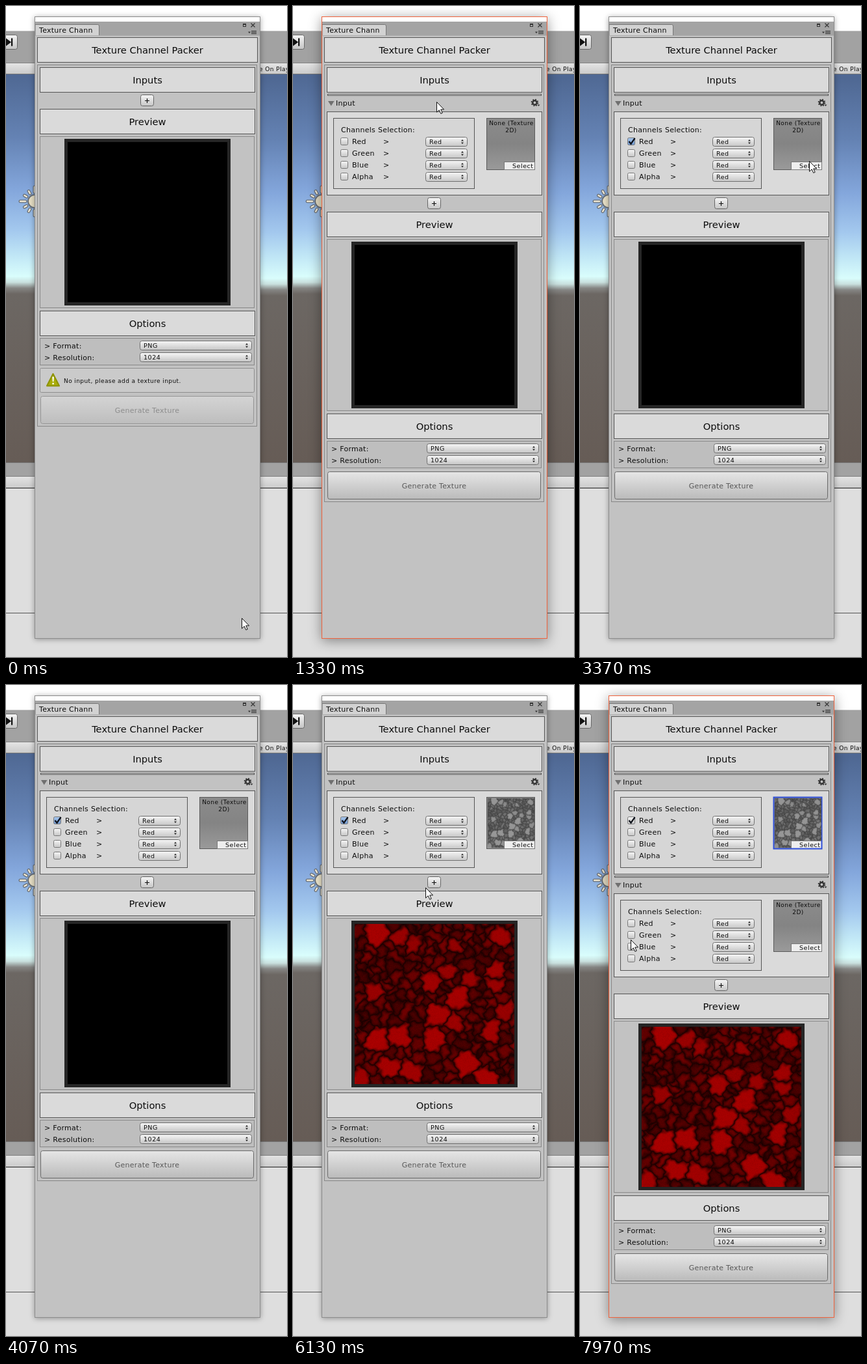
These frames come from a looping animation (433x1000 px, 8 s). An HTML page with a canvas:

```html
<!DOCTYPE html>
<html lang="en">
<head>
<meta charset="utf-8">
<title>Texture Channel Packer</title>
<style>
  html, body { margin: 0; width: 100%; height: 100%; overflow: hidden; background: #dedede; }
  #stage { position: relative; width: 433px; height: 1000px; overflow: hidden; }
  svg, canvas, #shadow { position: absolute; left: 0; top: 0; }
  #shadow { left: 44px; top: 16px; width: 348px; height: 956px; }
  text { font-family: "DejaVu Sans", Verdana, sans-serif; fill: #0c0c0c; white-space: pre; }
  .head { font-size: 14.7px; text-anchor: middle; }
  .body { font-size: 11px; letter-spacing: .28px; }
  .pop { font-size: 9.5px; letter-spacing: .55px; }
  .mini { font-size: 9px; letter-spacing: .45px; }
  .mid { text-anchor: middle; }
</style>
</head>
<body>
<div id="stage">
  <svg id="back" width="433" height="1000"></svg>
  <div id="shadow"></div>
  <svg id="ui" width="433" height="1000"></svg>
  <canvas id="preview" width="246" height="246"></canvas>
  <canvas id="thumb" width="72" height="76"></canvas>
  <svg id="top" width="433" height="1000">
    <path id="cursor" d="M.5 .5V16.2L4.2 12.8L6.8 18.4L9.2 17.3L6.7 11.9H11.6Z" fill="#fff" stroke="#111" stroke-width="1"/>
  </svg>
</div>
<script>
const $ = id => document.getElementById(id);
const LOOP = 8000, ROW = 158;

// ---------- markup helpers ----------
const rect = (x, y, w, h, fill, stroke, more = '') =>
  `<rect x="${x}" y="${y}" width="${w}" height="${h}" fill="${fill}" ${stroke ? `stroke="${stroke}"` : ''} ${more}/>`;
const box = (x1, y1, x2, y2, fill, stroke, more) =>
  rect(x1 + .5, y1 + .5, x2 - x1 - 1, y2 - y1 - 1, fill, stroke, more);
const text = (x, y, cls, s, more = '') => `<text x="${x}" y="${y}" class="${cls}" ${more}>${s}</text>`;
const path = (d, fill, more = '') => `<path d="${d}" fill="${fill}" ${more}/>`;
const gradient = (id, stops) => `<linearGradient id="${id}" x2="0" y2="1">` +
  stops.map(([at, c]) => `<stop offset="${at}" stop-color="${c}"/>`).join('') + '</linearGradient>';
const header = (y, s) => box(52, y, 384, y + 39, '#dadada', '#555') + text(218, y + 25, 'head', s);
const popup = (x1, y, x2, s) => {
  const a = x2 - 8, m = y + 7.5;
  return box(x1, y, x2, y + 15, 'url(#btn)', '#707070', 'rx="3"') +
    text(x1 + 6, y + 11, 'pop', s) +
    path(`M${a - 2} ${m - 1}h4l-2 -2.6zM${a - 2} ${m + 1}h4l-2 2.6z`, '#222');
};

// ---------- editor behind the window ----------
function sun() {
  let rays = '';
  for (let i = 0; i < 12; i++) {
    const a = i * Math.PI / 6, r = i % 3 ? 18 : 22, c = Math.cos(a), s = Math.sin(a);
    rays += `M${44 + 14 * c} ${300 + 14 * s}L${44 + r * c} ${300 + r * s}`;
  }
  const ray = (color, w) => path(rays, 'none', `stroke="${color}" stroke-width="${w}" stroke-linecap="round"`);
  return ray('#697079', 5) + ray('#eee7d2', 2.4) +
    '<circle cx="44" cy="300" r="10" fill="#e6dec4" stroke="#697079" stroke-width="2"/>';
}
const sky = [[0, '#4f6893'], [.16, '#6482b3'], [.3, '#84a7dc'], [.4, '#a3c8ee'], [.47, '#c2e8f6'],
  [.52, '#d9fdfc'], [.535, '#c9e0de'], [.55, '#858583'], [.565, '#6c6763'], [1, '#665c56']];
$('back').innerHTML = `<defs>${gradient('sky', sky)}${gradient('bar', [[0, '#e4e4e4'], [1, '#cbcbcb']])}
  ${gradient('step', [[0, '#f5f5f5'], [1, '#c4c4c4']])}</defs>` +
  rect(0, 0, 433, 38, '#fff') + rect(0, 38, 433, 50, '#a2a2a2') + rect(0, 38, 433, 1, '#c2c2c2') +
  box(-10, 44, 18, 67, 'url(#step)', '#666', 'rx="3"') +
  path('M0 49.5V61.5L8 55.5ZM8 49.5h2.2v12H8Z', '#111') +
  rect(0, 88, 433, 16, 'url(#bar)') + rect(0, 87, 433, 1, '#808080') + rect(0, 104, 433, 1, '#777') +
  text(390, 100, 'mini', 'e On Play') +
  rect(0, 105, 44, 597, 'url(#sky)') + rect(391, 111, 42, 591, 'url(#sky)') + rect(391, 105, 42, 7, '#4f6893') +
  sun() +
  rect(0, 701, 433, 21, '#a2a2a2') + rect(0, 701, 433, 1, '#777') +
  rect(0, 722, 433, 18, 'url(#bar)') + rect(0, 722, 433, 1, '#808080') +
  rect(0, 740, 433, 1, '#222') + rect(0, 741, 433, 259, '#dedede') + rect(0, 932, 433, 1, '#555');

// ---------- packer window ----------
function inputBlock(id) {
  let s = box(53, 135, 383, 138, '#dadada', '#555') +
    path('M54 146h9.5l-4.75 7.5z', '#707070') + text(66, 153, 'body', 'Input') +
    '<circle cx="372.5" cy="148.5" r="3.2" fill="none" stroke="#333" stroke-width="2.4"/>' +
    '<circle cx="372.5" cy="148.5" r="4.9" fill="none" stroke="#333" stroke-width="1.8" stroke-dasharray="1.92 1.93"/>' +
    path('M376.5 151.5h4l-2 2.5z', '#333') +
    box(52, 162, 384, 291, '#dadada', '#555') + box(62, 172, 280, 281, '#d6d6d6', '#555') +
    text(74, 194, 'body', 'Channels Selection:');
  ['Red', 'Green', 'Blue', 'Alpha'].forEach((name, i) => {
    const y = 202 + 18 * i;
    s += box(73, y, 85, y + 12, 'url(#btn)', '#777', `rx="2" id="${id}box${i}"`) +
      text(91, y + 10, 'body', name) + text(139, y + 10, 'body', '&gt;') + popup(204, y - 1, 269, 'Red');
  });
  s += path('M75.5 208l3 3.6L84.6 203', 'none', `id="${id}tick" stroke="#0b0f18" stroke-width="2.2"`) +
    box(298, 172, 373, 252, 'url(#slot)', '#5a5a5a') +
    text(336.5, 183, 'mini mid', 'None (Texture') + text(336, 194, 'mini mid', '2D)') +
    box(325, 239, 373, 252, '#eee', '#777') + text(338, 249, 'pop', 'Select') +
    rect(298.5, 172.5, 74, 79, 'none', '#2f4fd8', `stroke-width="2" id="${id}ring"`);
  return `<g id="${id}">${s}</g>`;
}

$('ui').innerHTML = `<defs>
  ${gradient('btn', [[0, '#f6f6f6'], [1, '#c6c6c6']])}
  ${gradient('down', [[0, '#a4a4a4'], [1, '#b8b8b8']])}
  ${gradient('on', [[0, '#a9c8ee'], [1, '#6f97cf']])}
  ${gradient('big', [[0, '#e6e6e6'], [1, '#bababa']])}
  ${gradient('slot', [[0, '#8b8b8b'], [.5, '#848484'], [1, '#9a9a9a']])}</defs>` +
  rect(44, 16, 348, 956, '#c2c2c2') + rect(45, 17, 346, 7, '#fff') + rect(45, 24, 346, 22, '#a4a4a4') +
  path('M45 46V28.5H141.5Q143.5 28.5 143.5 31V46', '#d2d2d2', 'stroke="#777"') +
  rect(45, 45, 346, 1, '#b0b0b0') + rect(45, 46, 346, 2, '#c2c2c2') +
  text(51, 41, 'body', 'Texture Chann') +
  rect(365.5, 27.5, 4, 4, 'none', '#333') + rect(365, 27, 5, 2, '#333') +
  path('M377.5 26.5l6 6m0 -6l-6 6', 'none', 'stroke="#333" stroke-width="1.1"') +
  path('M373 39.5h4l-2 2.5z', '#333') + path('M378 38.5h8m-8 2h8m-8 2h8', 'none', 'stroke="#333"') +
  rect(44.5, 16.5, 347, 955, 'none', '#8c8c8c', 'id="edge"') +
  box(48, 48, 388, 87, '#dadada', '#555') + text(218, 73, 'head', 'Texture Channel Packer') +
  box(48, 90, 387, 646, 'none', '#888', 'id="frame"') +
  header(94, 'Inputs') + inputBlock('a') + inputBlock('b') +
  '<g id="rest">' +
  box(207, 136, 228, 154, 'url(#btn)', '#666', 'rx="3" id="plus"') +
  path('M214 145.5h7m-3.5 -3.5v7', 'none', 'stroke="#111" stroke-width="1.2"') +
  header(158, 'Preview') + box(52, 200, 383, 464, 'none', '#8a8a8a') +
  rect(90, 204, 256, 256, '#252525') + rect(95, 209, 246, 246, '#000') +
  header(468, 'Options') + box(52, 510, 383, 552, '#bebebe', '#888') +
  text(59, 526, 'body', '&gt; Format:') + popup(206, 514, 379, 'PNG') +
  text(59, 544, 'body', '&gt; Resolution:') + popup(206, 532, 379, '1024') +
  '<g id="help">' + box(52, 556, 383, 594, '#cacaca', '#8f8f8f', 'rx="2"') +
  path('M72.5 565L82 583.5H63Z', '#a9ad0a', 'stroke="#8c9100" stroke-width="2" stroke-linejoin="round"') +
  path('M71.3 569.5h2.6l-.5 7.5h-1.6zM71.4 578.8h2.4v2.4h-2.4z', '#fff') +
  text(89, 579, 'mini', 'No input, please add a texture input.', 'style="letter-spacing:.4px"') + '</g>' +
  '<g id="make">' + box(53, 599, 382, 642, 'url(#big)', '#6a6a6a', 'rx="3"') +
  text(217.5, 625, 'body mid', 'Generate Texture', 'style="fill:#585858"') + '</g></g>';

// ---------- stone texture: weighted cells, bright stones first ----------
const stones = [[33, 18, 15], [157, 113, 15], [127, 138, 15], [35, 178, 16], [67, 173, 15], [123, 178, 15],
  [202, 238, 15], [51, 220, 15], [87, 225, 13], [170, 211, 15], [217, 71, 13], [215, 91, 10], [210, 165, 13],
  [223, 18, 12], [155, 153, 11], [115, 88, 13], [140, 73, 9], [70, 18, 10], [30, 103, 10], [8, 238, 12],
  [230, 133, 9], [90, 33, 8], [155, 33, 8], [180, 83, 10]];
let seed = 71;
const rnd = () => (seed = (seed * 16807) % 2147483647) / 2147483647;

function paintTexture() {
  const N = 246;
  const cells = stones.map(([x, y, r]) => ({ x, y, r: r * .75, lum: 125 + r * 2.6 }));
  for (let i = 0; i < 520; i++) {
    const x = rnd() * 266 - 10, y = rnd() * 266 - 10, r = rnd() * 4;
    if (cells.every(c => Math.hypot(c.x - x, c.y - y) > c.r * 1.35 + 5 + r * .5))
      cells.push({ x, y, r, lum: 65 + rnd() * 55 });
  }
  const red = $('preview').getContext('2d');
  const tmp = document.createElement('canvas');
  tmp.width = tmp.height = N;
  const gray = tmp.getContext('2d');
  const a = red.createImageData(N, N), b = gray.createImageData(N, N);
  for (let y = 0; y < N; y++) for (let x = 0; x < N; x++) {
    const px = x + 2 * Math.sin(y * .21 + x * .05) + 1.2 * Math.sin(y * .53 - x * .17);
    const py = y + 2 * Math.sin(x * .19 - y * .06) + 1.2 * Math.sin(x * .47 + y * .23);
    let d1 = 1e9, d2 = 1e9, near = null;
    for (const c of cells) {
      const d = Math.sqrt((c.x - px) ** 2 + (c.y - py) ** 2) - c.r;
      if (d < d1) { d2 = d1; d1 = d; near = c; } else if (d < d2) d2 = d;
    }
    const k = Math.min(1, (d2 - d1) / 12), soft = k * (2 - k);
    const v = Math.max(12, 26 + (near.lum - 26) * soft + (rnd() - .5) * 14);
    const i = 4 * (y * N + x), g = 48 + v * .62;
    a.data[i] = v;
    b.data[i] = b.data[i + 1] = b.data[i + 2] = g;
    a.data[i + 3] = b.data[i + 3] = 255;
  }
  red.putImageData(a, 0, 0);
  gray.putImageData(b, 0, 0);
  const small = $('thumb').getContext('2d');
  small.imageSmoothingQuality = 'high';
  small.drawImage(tmp, 0, 0, 72, 76);
  small.clearRect(25, 65, 47, 11); // room for the Select button
}
paintTexture();
$('thumb').style.transform = 'translate(300px,174px)';

// ---------- timeline ----------
const ADD = [930, 6450], CHECK = 2230, LOAD = 4900, BLUR = 3330, FOCUS = [800, 6350];
const track = [[0, 363, 940], [30, 363, 940], [430, 272, 500], [770, 218, 145], [930, 218, 145], [1330, 221, 147],
  [1430, 221, 147], [1680, 229, 183], [2150, 78, 205], [2300, 78, 205], [2500, 90, 209], [2570, 127, 211],
  [2720, 235, 174], [2970, 352, 236], [3230, 352, 236], [3600, 356, 242], [3800, 356, 242], [4060, -14, 409],
  [5690, -14, 395], [6130, 204, 311], [6300, 216, 302], [6450, 216, 302], [6560, 218, 309], [6760, 230, 400],
  [6970, 189, 463], [7180, 24, 408], [7330, 72, 367], [7470, 72, 367], [7970, 78, 391], [8000, 78, 391]];

// Smooth path through the track; the pointer rests where two points agree.
function slope(i, k) {
  const p = track[i - 1], q = track[i], r = track[i + 1];
  const same = (u, v) => u[1] === v[1] && u[2] === v[2];
  if (!p || !r || same(p, q) || same(q, r)) return 0;
  return (r[k] - p[k]) / (r[0] - p[0]);
}
function pointer(t) {
  let i = 0;
  while (i < track.length - 2 && track[i + 1][0] <= t) i++;
  const p = track[i], q = track[i + 1], d = q[0] - p[0], u = (t - p[0]) / d;
  return [1, 2].map(k => {
    const h = u * u * (3 - 2 * u);
    return p[k] + (q[k] - p[k]) * h + d * u * (1 - u) * (slope(i, k) * (1 - u) - slope(i + 1, k) * u);
  });
}

const show = (id, on) => $(id).style.display = on ? '' : 'none';
const attr = (id, name, v) => $(id).setAttribute(name, v);
const move = (id, y) => attr(id, 'transform', `translate(0 ${y})`);

function draw(t) {
  const n = ADD.filter(at => t >= at).length;
  const refocus = t >= FOCUS[1];
  const focused = (t >= FOCUS[0] && t < BLUR) || refocus;
  const pressed = FOCUS.some((f, i) => t >= f && t < ADD[i]);
  const [x, y] = pointer(t);
  show('a', n > 0);
  show('b', n > 1);
  show('help', n === 0);
  move('rest', n * ROW);
  move('make', n ? -42 : 0);
  attr('make', 'opacity', n ? 1 : .5);
  attr('frame', 'height', 555 + n * ROW - (n ? 42 : 0));
  attr('plus', 'fill', pressed ? 'url(#down)' : 'url(#btn)');
  attr('edge', 'stroke', focused ? '#f0623c' : '#8c8c8c');
  $('shadow').style.boxShadow = focused ? '0 3px 18px rgba(0,0,0,.42)' : '0 1px 8px rgba(0,0,0,.36)';
  show('atick', t >= CHECK);
  attr('abox0', 'fill', t >= CHECK && !refocus ? 'url(#on)' : 'url(#btn)');
  show('aring', refocus);
  show('preview', t >= LOAD);
  show('thumb', t >= LOAD);
  $('preview').style.transform = `translate(95px,${209 + n * ROW}px)`;
  attr('cursor', 'transform', `translate(${Math.round(x)} ${Math.round(y)})`);
}

move('b', ROW);
show('btick', false);
show('bring', false);
const start = performance.now();
function tick() {
  draw((performance.now() - start) % LOOP);
  requestAnimationFrame(tick);
}
draw(0);
requestAnimationFrame(tick);
</script>
</body>
</html>
```
